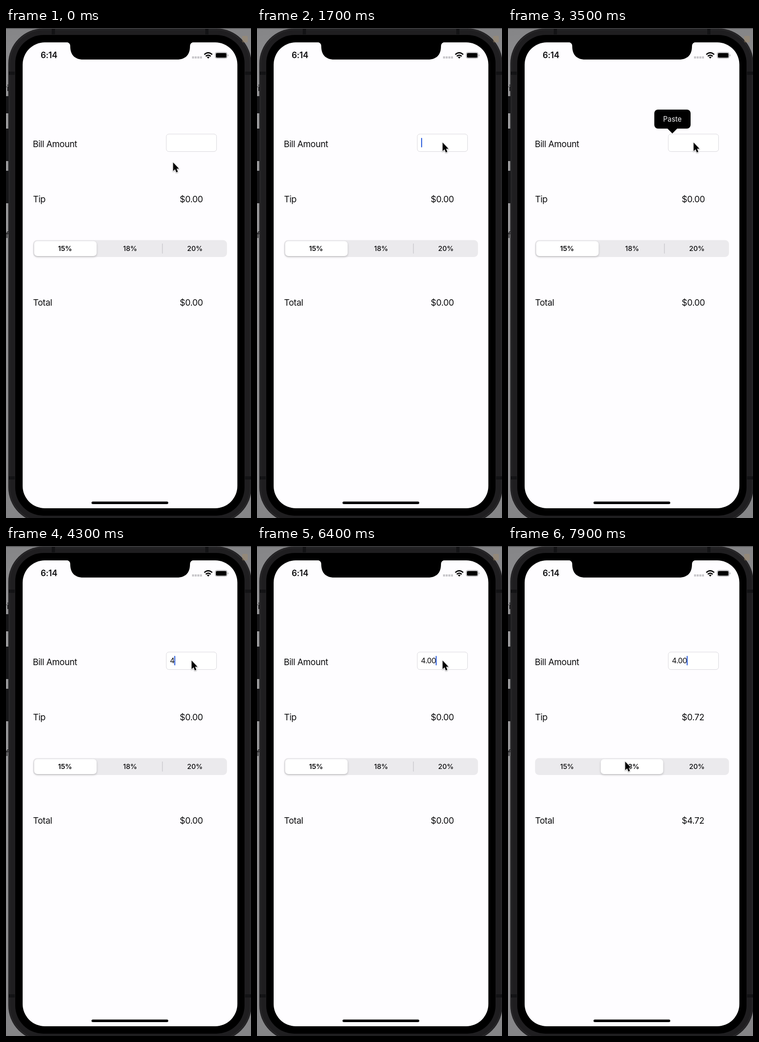
Recreate the animation shown at these times as an HTML page. Size 530 by 1057 pixels, loop 8000 ms.

```html
<!DOCTYPE html>
<html lang="en">
<head>
<meta charset="utf-8">
<title>Tip calculator</title>
<style>
  html, body { margin: 0; width: 100%; height: 100%; overflow: hidden; background: #8c8c8e; }
  svg { display: block; width: 530px; height: 1057px; }
  text { font-family: Inter, "Liberation Sans", sans-serif; fill: #0b0b0d; }
  .label { font-size: 18.8px; letter-spacing: -.4px; }
  .entry { font-size: 16px; letter-spacing: -.4px; }
  .segment { font-size: 15px; font-weight: 500; letter-spacing: -.1px; text-anchor: middle; }
  .thumb { filter: drop-shadow(0 2px 2px rgba(0, 0, 0, .2)); }
  .pointer { filter: drop-shadow(0 1.5px 1px rgba(0, 0, 0, .35)); }
</style>
</head>
<body>
<svg viewBox="0 0 530 1057">
  <defs>
    <linearGradient id="wall" x2="0" y2="1">
      <stop offset="0" stop-color="#858587"/>
      <stop offset=".2" stop-color="#98989a"/>
      <stop offset="1" stop-color="#858587"/>
    </linearGradient>
  </defs>

  <!-- Backdrop and phone -->
  <rect width="530" height="1057" fill="url(#wall)"/>
  <rect width="530" height="2" fill="#5b5b5d"/>
  <text x="6" y="136" font-size="18" text-anchor="end" fill="#29292b">vi</text>
  <text x="6" y="453" font-size="18" text-anchor="end" fill="#29292b">f</text>
  <g fill="#161618">
    <rect x="-3" y="147" width="12" height="37" rx="2"/>
    <rect x="-3" y="217" width="12" height="70" rx="2"/>
    <rect x="-3" y="308" width="12" height="70" rx="2"/>
  </g>
  <rect x="5" y="1" width="526" height="1066" rx="76" fill="#1f1e20"/>
  <rect x="7.5" y="3.5" width="521" height="1061" rx="74" fill="none" stroke="#29282a" stroke-width="2"/>
  <g fill="#131315">
    <rect x="99" y="2" width="7" height="12"/>
    <rect x="431" y="2" width="7" height="12"/>
    <rect x="6" y="94" width="13" height="7"/>
    <rect x="6" y="967" width="13" height="7"/>
    <rect x="517" y="94" width="13" height="7"/>
    <rect x="517" y="967" width="13" height="7"/>
  </g>
  <rect x="511" y="17" width="12" height="14" rx="2" fill="#a48b68" opacity=".45"/>
  <rect x="20" y="15" width="496" height="1037" rx="61"/>
  <rect x="36" y="31" width="464.5" height="1005" rx="48" fill="#fefdff"/>
  <path d="M130 30.5Q139 31 139 39.5C139 58 149 68 167 68H370C388 68 398 58 398 39.5Q398 31 407 30.5Z"/>
  <rect x="185" y="1021.5" width="166" height="5.5" rx="2.75"/>

  <!-- Status bar -->
  <text x="75" y="65" font-size="18" font-weight="600" letter-spacing="-.2">6:14</text>
  <path d="M402.5 63.5h21.5" stroke="#c5c4c8" stroke-width="4.5" stroke-dasharray="4.3 1.4"/>
  <g fill="none" stroke="#000" stroke-width="2.7">
    <path d="M429 57.3Q437.5 49.5 446 57.3"/>
    <path d="M432.2 60.9Q437.5 56.2 442.8 60.9"/>
  </g>
  <path d="M434.6 63Q437.5 60.6 440.4 63L437.5 66Z"/>
  <rect x="452.5" y="52.5" width="26" height="13" rx="4" fill="none" stroke="#929295"/>
  <rect x="454" y="54" width="23" height="10" rx="2.5"/>
  <path d="M480 56.5Q482.4 59 480 61.5Z" fill="#929295"/>

  <!-- Form -->
  <g class="label">
    <text x="58" y="256.7">Bill Amount</text>
    <text x="58.5" y="376.2">Tip</text>
    <text x="58.5" y="599.2">Total</text>
    <text x="375.8" y="376.2" id="tip"></text>
    <text x="375.8" y="599.2" id="total"></text>
  </g>
  <rect x="346.8" y="228.8" width="108.7" height="37.7" rx="5.5" fill="#fff" stroke="#d9d8dd"/>
  <text class="entry" x="354.5" y="253" id="entry"></text>
  <rect y="237" width="2.2" height="20.5" rx="1" fill="#3262dc" id="caret"/>
  <g id="menu">
    <path d="M344 216H367L355.5 227.5Z"/>
    <rect x="316.5" y="176" width="78.5" height="41" rx="8"/>
    <text x="355.7" y="202.3" font-size="15.3" text-anchor="middle" style="fill:#efeff0">Paste</text>
  </g>

  <!-- Rate picker -->
  <rect x="58.5" y="457.5" width="419.5" height="36.5" rx="8.5" fill="#ebeaed"/>
  <rect x="337.7" y="465" width="1.4" height="21.5" fill="#c9c8cd" id="divider"/>
  <rect class="thumb" x="61" y="459.8" width="135" height="32.2" rx="7" fill="#fff" id="thumb"/>
  <g class="segment">
    <text x="127.7" y="481.3" id="rate15">15%</text>
    <text x="268.5" y="481.3" id="rate18">18%</text>
    <text x="408.5" y="481.3">20%</text>
  </g>

  <path class="pointer" id="pointer" d="M0 0V18.5L4.2 14.8L7 21.5L10.3 20L7.5 13.6H12.8Z"
        stroke="#fff" stroke-width="2" paint-order="stroke" stroke-linejoin="round"/>
</svg>
<script>
  const $ = id => document.getElementById(id);
  const LOOP = 8000, STEP = 100;

  // Tracks are lists of [time, ...values]
  const pointerTrack = [
    [0, 361.5, 290], [900, 401.5, 259], [1400, 401.5, 259], [1600, 401.5, 247],
    [6600, 401.5, 247], [7200, 242.5, 470], [7300, 242.5, 470], [7500, 253.5, 465]
  ];
  const menuTrack = [[2100, 0], [2400, 1], [4000, 1], [4200, 0]];
  const thumbTrack = [[7400, 0], [7800, 1]];
  // Each blink switches the caret over two steps
  const blinks = [1500, 2100, 2500, 2800, 3100, 3400, 3800, 4100, 4200,
                  5900, 6300, 6700, 7250, 7500, 7800];
  const keys = [[0, ""], [4200, "4"], [4800, "4."], [5100, "4.0"], [5400, "4.00"]];
  const caretX = [355, 364, 368, 377, 386.5];

  const smooth = p => p * p * (3 - 2 * p);

  function sample(track, t) {
    const next = track.findIndex(k => k[0] > t);
    if (next === 0) return track[0].slice(1);
    if (next < 0) return track[track.length - 1].slice(1);
    const a = track[next - 1], b = track[next];
    const p = smooth((t - a[0]) / (b[0] - a[0]));
    return a.slice(1).map((v, i) => v + (b[i + 1] - v) * p);
  }

  function caretAlpha(t) {
    const count = blinks.filter(b => b <= t).length;
    if (!count) return 0;
    const p = Math.min(1, (t - blinks[count - 1] + STEP) / (2 * STEP));
    return count % 2 ? p : 1 - p;
  }

  function draw(now) {
    const t = Math.floor(now % LOOP / STEP) * STEP;
    const typed = keys.filter(k => k[0] <= t).length - 1;
    const [x, y] = sample(pointerTrack, t);
    const [slide] = sample(thumbTrack, t);
    const picked = t >= 7500;

    $("pointer").setAttribute("transform", `translate(${x} ${y})`);
    $("menu").setAttribute("opacity", sample(menuTrack, t)[0]);
    $("entry").textContent = keys[typed][1];
    $("caret").setAttribute("x", caretX[typed]);
    $("caret").setAttribute("opacity", caretAlpha(t));
    $("thumb").setAttribute("x", 61 + 139.7 * slide);
    $("divider").setAttribute("opacity", 1 - slide);
    $("rate15").style.fontWeight = picked ? 500 : 600;
    $("rate18").style.fontWeight = picked ? 600 : 500;
    $("tip").textContent = picked ? "$0.72" : "$0.00";
    $("total").textContent = picked ? "$4.72" : "$0.00";
  }

  const start = performance.now();
  function tick() {
    draw(performance.now() - start);
    requestAnimationFrame(tick);
  }
  tick();
</script>
</body>
</html>
```
